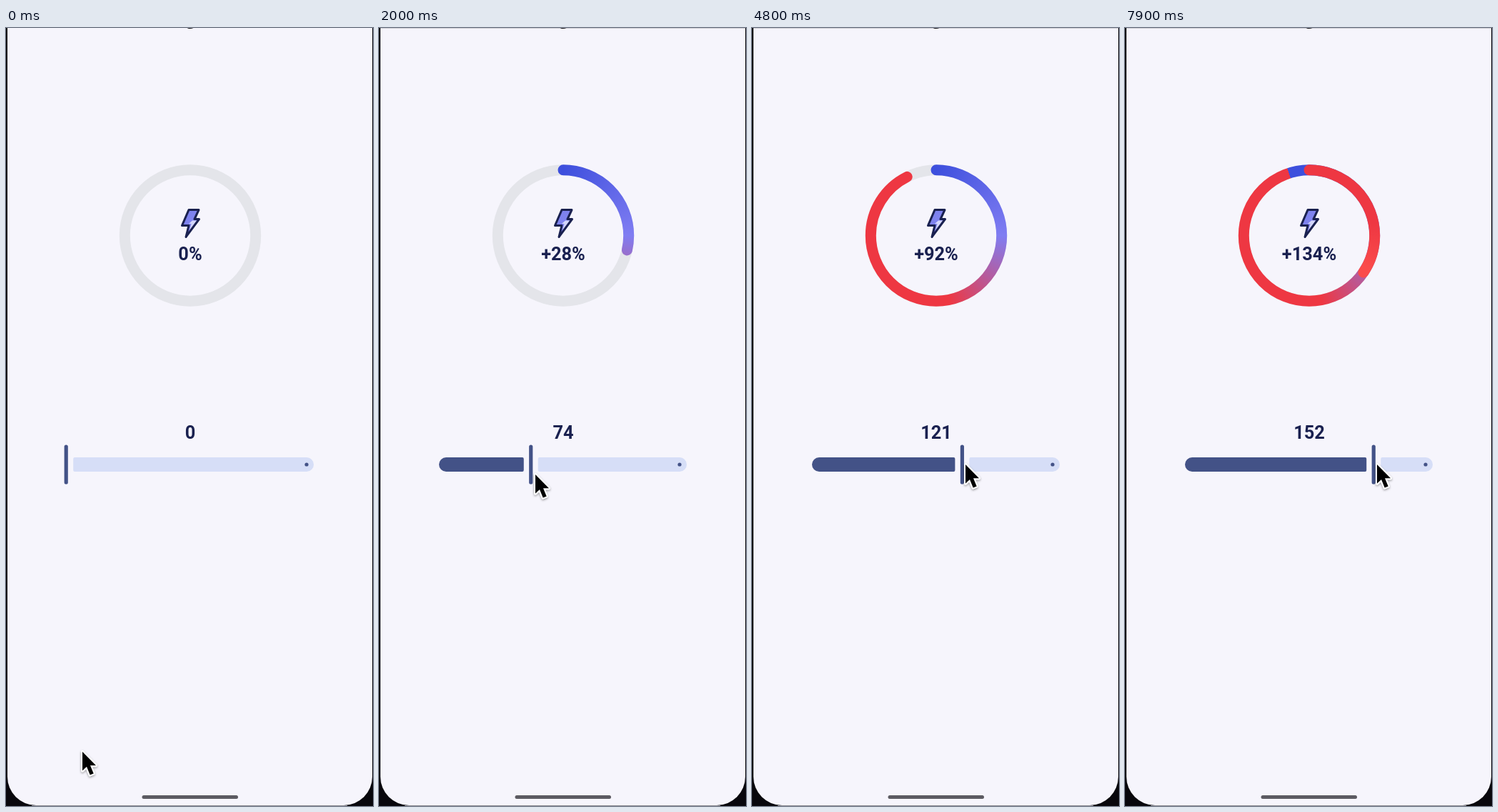
An HTML page with a canvas that plays this animation: 514 px wide and 1089 px high, repeating every 8 s.

```html
<!DOCTYPE html>
<html lang="en">
<head>
<meta charset="utf-8">
<title>Charge ring</title>
<style>
  html, body { margin: 0; width: 514px; height: 1089px; overflow: hidden; background: #08070c; }
  canvas, svg { position: absolute; left: 0; top: 0; display: block; }
  text { font: 600 25.4px Roboto, sans-serif; fill: #1a2150; text-anchor: middle; }
</style>
</head>
<body>
<canvas id="ring" width="514" height="1089"></canvas>
<svg width="514" height="1089" viewBox="0 0 514 1089">
  <defs>
    <filter id="shadow" x="-50%" y="-50%" width="200%" height="200%">
      <feDropShadow dx="0" dy="1.5" stdDeviation="1.5" flood-color="#000" flood-opacity=".4"/>
    </filter>
    <linearGradient id="boltFill" x1="0" y1="0" x2="1" y2="1">
      <stop offset="0" stop-color="#7b80ee"/>
      <stop offset="1" stop-color="#8487ee"/>
    </linearGradient>
  </defs>

  <rect id="topLine" x="2" width="511" height="1" fill="#d2d1d7"/>
  <path d="M253.500 0H262.500Q258 2.200 253.500 0Z" fill="#18171c"/>

  <g stroke-linejoin="round">
    <path d="M256 254.500H270L264 267.500H270.500L252 292.500L256 276.500H246.500Z" fill="url(#boltFill)"/>
    <path d="M261 269.500H267.500L257 283L259.500 274H256Z" fill="#d3d6fb"/>
    <path d="M256 254.500H270L264 267.500H270.500L252 292.500L256 276.500H246.500Z" fill="none" stroke="#1a2150" stroke-width="3"/>
  </g>
  <text id="percent" x="258" y="325"></text>
  <text id="value" x="258" y="575"></text>

  <path id="rest" fill="#d6def7"/>
  <path id="done" fill="#435287"/>
  <circle cx="421" cy="611" r="2.600" fill="#435287"/>
  <rect id="thumb" y="583.500" width="5.200" height="55" rx="2.600" fill="#435287"/>
  <rect x="190.500" y="1074" width="134.500" height="5" rx="2.500" fill="#5c5b62"/>

  <g id="cursor" filter="url(#shadow)">
    <path d="M0 0V26.500L6 21L10.700 32.500L15.700 30.400L11 19.200H19Z"
      stroke="#fff" stroke-width="4" stroke-linejoin="round" paint-order="stroke"/>
  </g>
</svg>

<script>
const LOOP = 8000, STEP = 100, FILL_TIME = 2040;
const $ = id => document.getElementById(id);
const ctx = $('ring').getContext('2d');
const CX = 258, CY = 290.5, R = 91.7, TOP = -Math.PI / 2, TURN = Math.PI * 2;

// click time, ring start, new value
const clicks = [[1200, 1212, 74], [4000, 3990, 121], [7000, 7012, 152]];

// time, x, y, eased
const path = [
  [0, 107, 1013], [800, 217, 618, true], [900, 219, 625], [2450, 219, 625],
  [3200, 299, 611, true], [6150, 299, 611], [6600, 347, 612, true], [6800, 353, 611]
];

const smooth = u => u * u * (3 - 2 * u);
const clamp = u => Math.min(1, Math.max(0, u));

function cursorAt(t) {
  const i = path.findIndex(k => k[0] > t);
  if (i < 0) return path[path.length - 1].slice(1, 3);
  const a = path[i - 1], b = path[i];
  let u = (t - a[0]) / (b[0] - a[0]);
  if (b[3]) u = smooth(u);
  return [a[1] + (b[1] - a[1]) * u, a[2] + (b[2] - a[2]) * u];
}

function stateAt(t) {
  let value = 0, charge = 0;
  for (const [click, start, target] of clicks) {
    if (t < click) break;
    charge = value + (target - value) * clamp((t - start) / FILL_TIME);
    value = target;
  }
  return { value, charge };
}

// Begins a little before the top so that the first round cap stays in colour
function sweep(stops) {
  const lead = 0.05;
  const g = ctx.createConicGradient(TOP - lead * TURN, CX, CY);
  for (const [at, color] of stops) g.addColorStop(Math.min(1, at + lead), color);
  return g;
}

const firstLap = sweep([[0, '#3d4fdd'], [0.25, '#807df2'], [0.47, '#ee3742'], [0.94, '#ee3742']]);
const nextLap = sweep([[0, '#ee3742'], [0.22, '#ee3742'], [0.33, '#fa4b4b'], [0.9, '#fa4b4b']]);

function arc(turns, style) {
  ctx.strokeStyle = style;
  ctx.beginPath();
  ctx.arc(CX, CY, R, TOP, TOP + turns * TURN);
  ctx.stroke();
}

function drawPage() {
  ctx.fillStyle = '#08070c';
  ctx.fillRect(0, 0, 514, 1089);
  ctx.fillStyle = '#f6f5fc';
  ctx.beginPath();
  ctx.roundRect(2, -60, 511, 1148, [0, 0, 40, 40]);
  ctx.fill();
  ctx.fillStyle = '#8b8a90';
  ctx.fillRect(36, 1088, 442, 1);
}

function drawRing(charge) {
  ctx.lineWidth = 15;
  ctx.lineCap = 'butt';
  arc(1, '#e4e5ea');
  ctx.lineCap = 'round';
  if (charge <= 0) return;
  if (charge < 100) {
    arc(charge / 100, firstLap);
  } else {
    ctx.lineCap = 'butt';
    arc(1, firstLap);
    ctx.lineCap = 'round';
    arc((charge - 100) / 100, nextLap);
  }
}

function bar(x0, x1, left, right) {
  const w = x1 - x0;
  if (w <= left + right) return '';
  return `M${x0 + left} 601H${x1 - right}a${right} ${right} 0 0 1 ${right} ${right}` +
    `V${621 - right}a${right} ${right} 0 0 1 ${-right} ${right}H${x0 + left}` +
    `a${left} ${left} 0 0 1 ${-left} ${-left}V${601 + left}a${left} ${left} 0 0 1 ${left} ${-left}Z`;
}

function draw(t) {
  const { value, charge } = stateAt(t);
  const x = 84.2 + value * 1.737;
  const whole = Math.floor(charge + 1e-6);

  drawPage();
  drawRing(charge);
  $('percent').textContent = (whole > 0 ? '+' : '') + whole + '%';
  $('value').textContent = value;
  $('thumb').setAttribute('x', x - 2.6);
  $('rest').setAttribute('d', bar(x + 10, 431, 2, 10));
  $('done').setAttribute('d', bar(84, x - 10, 10, 2));
  $('topLine').setAttribute('visibility', t >= 1000 ? 'visible' : 'hidden');
  $('cursor').setAttribute('transform', `translate(${cursorAt(t)})`);
}

const begin = performance.now();
function tick() {
  const t = (performance.now() - begin) % LOOP;
  draw(Math.floor(t / STEP) * STEP);
  requestAnimationFrame(tick);
}
tick();
</script>
</body>
</html>
```
